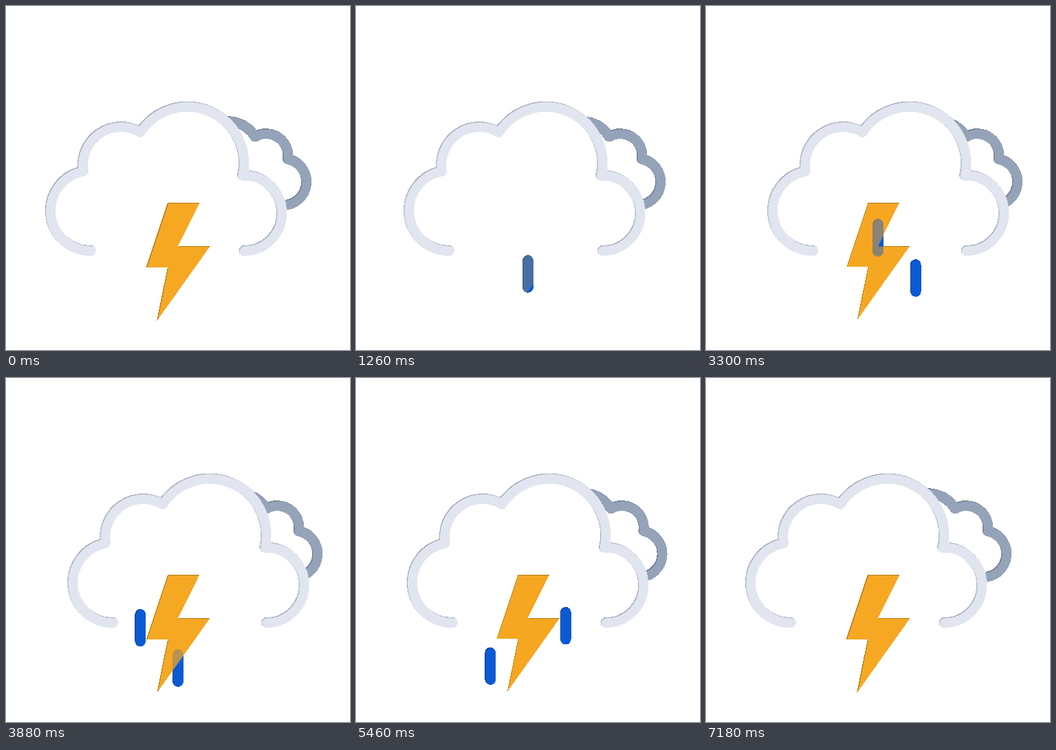
Animation of 500x500 px, one loop 7.2 s. Source, as an HTML page:

```html
<!DOCTYPE html>
<html lang="en">
<head>
<meta charset="utf-8">
<title>Thunderstorm</title>
<style>
  html, body { margin: 0; width: 100%; height: 100%; overflow: hidden; background: #fff; }
  svg { display: block; width: 100vw; height: 100vh; }

  .cloud, .drop line { fill: none; stroke-linecap: round; stroke-linejoin: round; filter: url(#rim); }
  .cloud { stroke-width: 15; }
  .back .cloud { stroke: #94a3b8; }
  .front .cloud { stroke: #e1e5ef; }
  .drop line { stroke: #0a5ad4; stroke-width: 15.6; }
  .bolt path { fill: #f6a823; filter: url(#rim); }
  .crisp { filter: url(#cut); }

  .back, .front { animation: drift 3.6s linear infinite alternate; }
  .back { --shift: 17.58px; }
  .front { --shift: 35.16px; }
  .drop { animation: fall 1.2s linear var(--delay) infinite; }
  .bolt { animation: flash 2.4s linear infinite; }

  @keyframes drift {
    from { transform: translateX(0); }
    to { transform: translateX(var(--shift)); }
  }
  @keyframes fall {
    0% { transform: translateY(-58.6px); }
    66.667%, 100% { transform: translateY(58.6px); }
    0%, 5%, 61.667%, 100% { opacity: 0; }
    8.333%, 58.333% { opacity: 1; }
  }
  @keyframes flash {
    0%, 21.667%, 43.333%, 65%, 86.667%, 100% { opacity: 1; }
    32.5%, 54.167%, 75.833% { opacity: .13; }
  }
</style>
</head>
<body>
<svg viewBox="0 0 500 500">
  <defs>
    <!-- Hard edges: anything under half opacity vanishes -->
    <filter id="cut" filterUnits="userSpaceOnUse" x="-60" y="-60" width="620" height="620" color-interpolation-filters="sRGB">
      <feComponentTransfer><feFuncA type="discrete" tableValues="0 1"/></feComponentTransfer>
    </filter>
    <!-- Soft outline with a thin shade on edges facing up and left -->
    <filter id="rim" filterUnits="userSpaceOnUse" x="-60" y="-60" width="620" height="620" color-interpolation-filters="sRGB">
      <feGaussianBlur stdDeviation=".45" result="soft"/>
      <feOffset dx="1" dy="1" result="moved"/>
      <feFlood flood-color="#fff"/>
      <feComposite in2="moved" operator="in" result="light"/>
      <feFlood flood-color="#b4b8c4" result="shade"/>
      <feComposite in="light" in2="shade" operator="over" result="tone"/>
      <feComposite in="soft" in2="tone" operator="arithmetic" k1="1" k2="0" k3="0" k4="0"/>
    </filter>
    <path id="puff" d="M346 355.5a54.7 54.7 0 0 0 0-109.4l-2.4.1A82 82 0 0 0 195 183.3A55.3 55.3 0 0 0 112.2 240A58.22 58.22 0 0 0 123.2 355.5"/>
  </defs>

  <g class="crisp">
    <g class="back">
      <path class="cloud" d="M403 289.6a34 34 0 0 0 6.4-67.3a31.6 31.6 0 0 0-47.4-32.2a47.5 47.5 0 0 0-86.5 36.2"/>
    </g>
  </g>

  <g class="front">
    <use href="#puff" fill="#fff"/>
    <g class="crisp"><use href="#puff" class="cloud"/></g>
  </g>

  <g class="crisp">
    <g class="drop" style="--delay: 0s"><line x1="195.2" y1="361" x2="195.2" y2="400"/></g>
    <g class="drop" style="--delay: -.4s"><line x1="250" y1="361" x2="250" y2="400"/></g>
    <g class="drop" style="--delay: -.8s"><line x1="304.8" y1="361" x2="304.8" y2="400"/></g>
    <g class="bolt">
      <path d="M235 286.1h46.4l-31.2 62.8h46.5l-77.6 109.2l15.8-78.4h-31.2z"/>
    </g>
  </g>
</svg>
</body>
</html>
```
